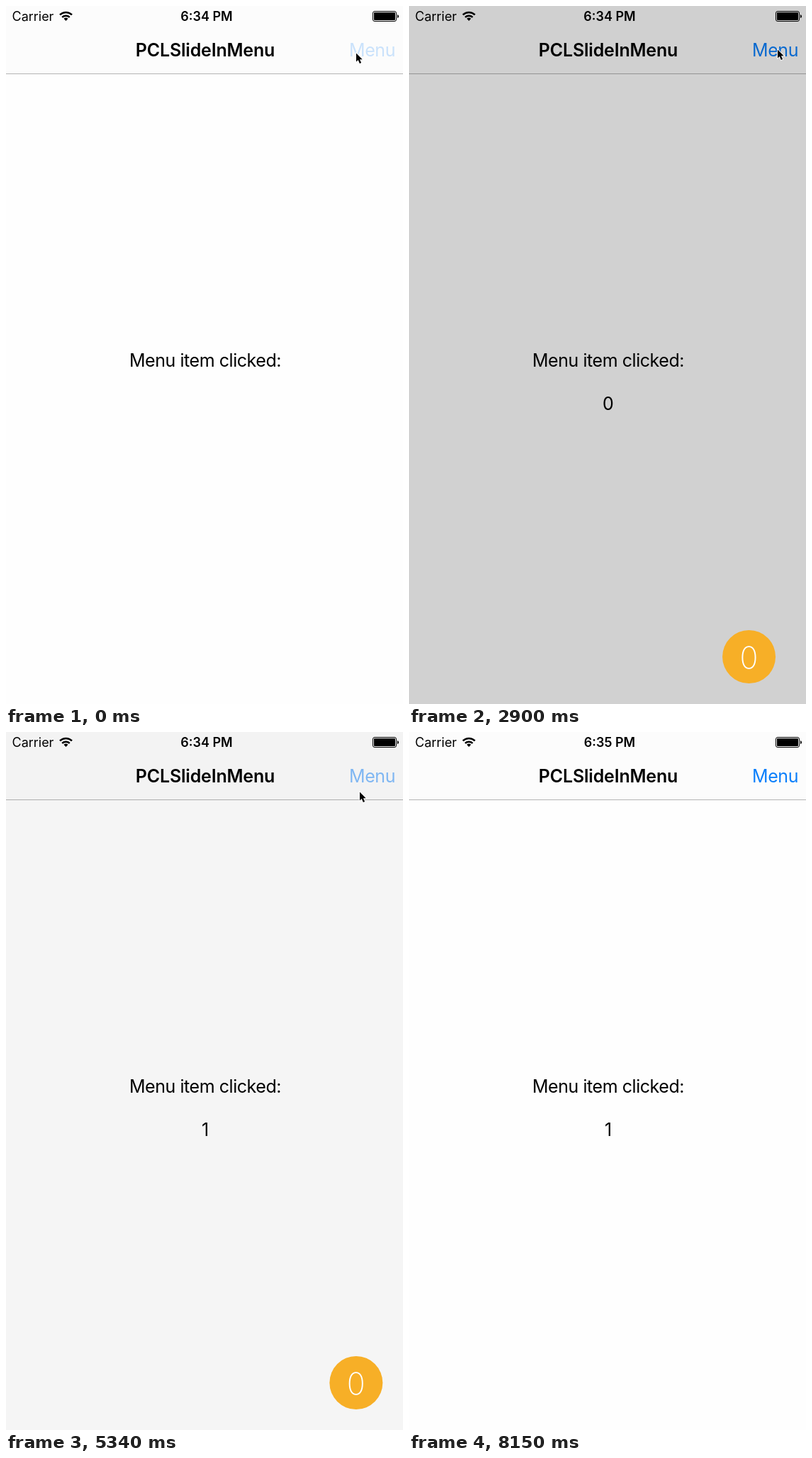
Write an HTML page that moves like this. It is 560 px wide and 983 px high and loops after 8750 ms.

```html
<!DOCTYPE html>
<html>
<head>
<meta charset="utf-8">
<style>
  html, body { margin: 0; width: 100%; height: 100%; overflow: hidden; background: #fefefe; }
  svg { display: block; width: 560px; height: 983px; font-family: Inter, Roboto, sans-serif; font-size: 25px; }
  .label { letter-spacing: -.45px; }
  .bold { font-weight: 600; }
  .mid { text-anchor: middle; }
  .status { font-size: 18px; }
  .digit { font-size: 43px; font-weight: 200; fill: #fff; text-anchor: middle; }
</style>
</head>
<body>
<svg viewBox="0 0 560 983">
  <rect width="560" height="983" fill="#fefefe"/>
  <rect width="560" height="95" fill="#fcfcfc"/>
  <rect y="95" width="560" height="1" fill="#b4b4b4"/>
  <text class="status" x="8.5" y="21">Carrier</text>
  <g fill="none" stroke="#000" stroke-width="2.5">
    <path d="M76 12.4a12.2 12.2 0 0 1 17 0M79.2 15.8a7.8 7.8 0 0 1 10.6 0"/>
    <path d="M84.5 21l-3-3.2a4.5 4.5 0 0 1 6 0z" fill="#000" stroke="none"/>
  </g>
  <text class="status bold mid" id="clock" x="283" y="21"></text>
  <rect x="517.5" y="7.5" width="33" height="14" rx="2.5" fill="none" stroke="#000"/>
  <rect x="519" y="9" width="30" height="11" rx="1"/>
  <path d="M552 12q2 .5 2 2.5t-2 2.5z"/>
  <text class="bold mid" x="281" y="71" letter-spacing="-.2">PCLSlideInMenu</text>
  <text class="label" id="menu" x="549" y="71" text-anchor="end" fill="#0b7ffb">Menu</text>
  <text class="label mid" x="281" y="508">Menu item clicked:</text>
  <text class="mid" id="item" x="281" y="569"></text>
  <rect id="dim" width="560" height="983"/>
  <g id="buttons"></g>
  <path id="cursor" d="M1 1.5v12l2.7-2.4 2.2 5 2.2-1-2.1-4.8h3.7z" stroke="#fff" stroke-width="1.6" paint-order="stroke"/>
</svg>
<script>
const LOOP = 8750, DIM = 0.27, TRAVEL = 120, STAGGER = 300;
const $ = id => document.getElementById(id);
const clamp = v => Math.min(1, Math.max(0, v));
const smooth = v => { v = clamp(v); return v * v * (3 - 2 * v); };
const mix = (a, b, p) => a.map((v, i) => v + (b[i] - v) * p);

// Each session: the menu is pressed, opens and closes while the cursor
// goes from home to its pick, then leaves for the next home.
const sessions = [
  { press: -60, open: 0, aim: 390, arrive: 1340, close: 1585, leave: 1740, home: [493, 65], pick: [475, 931] },
  { press: 2540, open: 2600, aim: 2900, arrive: 3600, close: 4124, leave: 4360, home: [519, 60], pick: [474, 810] },
  { press: 5110, open: 5230, aim: 5400, arrive: 6200, close: 6522, leave: 7460, home: [498, 83], pick: [363, 324] }
];
const EXIT = [474, 985], LEAVE_TIME = 690;

$('buttons').innerHTML = ['#f7af27', '#dadada', '#5398e7'].map((fill, i) =>
  `<g><circle cy="${916.5 - 90 * i}" r="37.5" fill="${fill}"/>` +
  `<text class="digit" y="${932.5 - 90 * i}">${i}</text></g>`).join('');
const buttons = [...$('buttons').children];

// share of the travel left, critically damped spring
function spring(ms) {
  const k = Math.max(0, ms) * 0.033;
  return (1 + k) * Math.exp(-k);
}

function draw(t) {
  const n = sessions.findLastIndex(s => t >= s.press);
  const { open, aim, arrive, close, leave, home, pick } = sessions[n];
  const next = sessions[n + 1]?.home ?? EXIT;
  const out = smooth((t - close) / 300);

  $('dim').setAttribute('opacity', DIM * smooth((t - open) / 500) * (1 - out));
  $('menu').setAttribute('opacity', 0.2 + 0.8 * clamp((t - open) / 300));
  buttons.forEach((b, i) => {
    const left = Math.max(spring(t - open - STAGGER * i), out);
    b.setAttribute('transform', `translate(${479.5 + TRAVEL * left})`);
  });

  const there = mix(home, pick, smooth((t - aim) / (arrive - aim)));
  const spot = mix(there, next, smooth((t - leave) / LEAVE_TIME));
  $('cursor').setAttribute('transform', `translate(${spot})`);

  $('item').textContent = t < 1640 ? '' : t < 4180 ? '0' : '1';
  $('clock').textContent = t < 6390 ? '6:34 PM' : '6:35 PM';
}

function tick() {
  draw(performance.now() % LOOP);
  requestAnimationFrame(tick);
}
tick();
</script>
</body>
</html>
```
